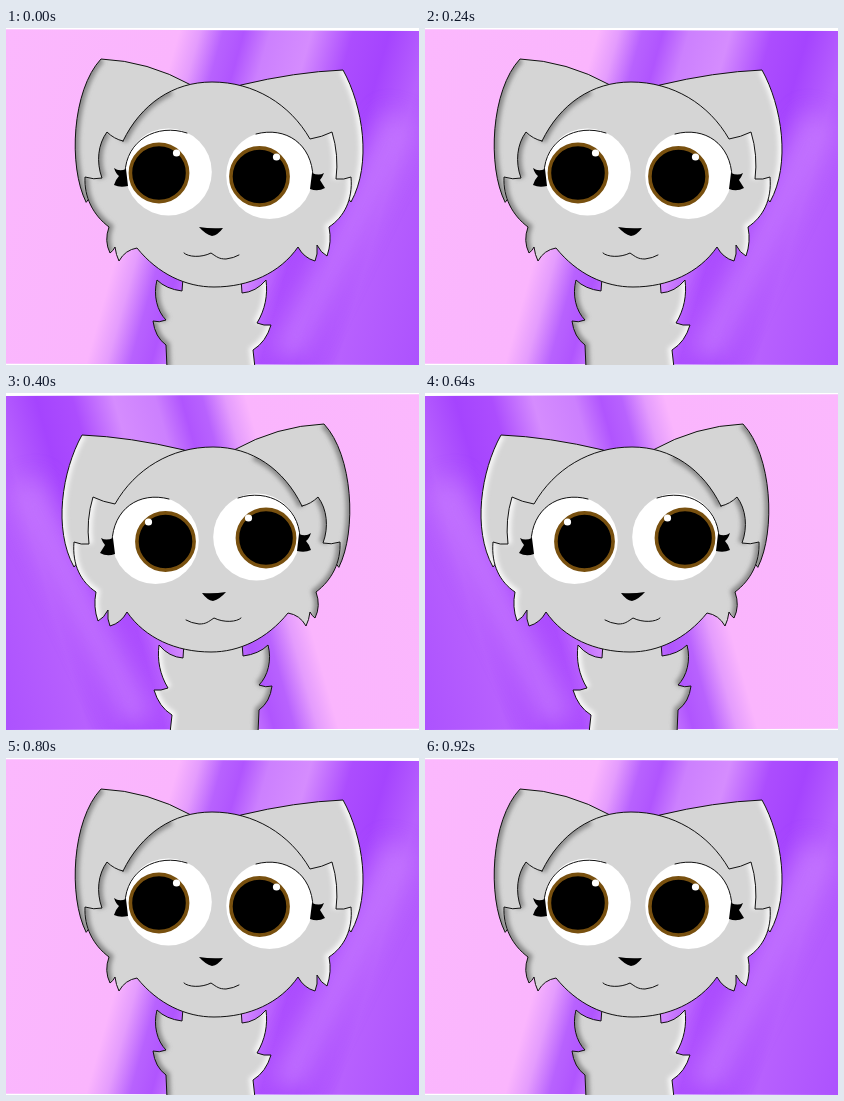
These frames come from a looping animation (413x337 px, 1000 ms). An HTML page:

```html
<!DOCTYPE html>
<html lang="en">
<head>
<meta charset="utf-8">
<title>Cat tilting its head</title>
<style>
html, body { margin: 0; width: 100%; height: 100%; overflow: hidden; background: #fff; }
svg { display: block; width: 100%; height: 100%; }
.line { fill: none; stroke: #111; stroke-width: 1; stroke-linejoin: round; stroke-linecap: round; }
.shade, .shine { fill: none; stroke-width: 8; filter: url(#soft); }
.shade { stroke: #8a8a8a; }
.shine { stroke: #f6f6f6; }
</style>
</head>
<body>
<svg viewBox="0 0 413 337">
  <defs>
    <linearGradient id="sky" gradientUnits="userSpaceOnUse" x1="0" y1="0" x2="482" y2="135">
      <stop offset="0" stop-color="#fbb8fd"/>
      <stop offset=".335" stop-color="#fab5fd"/>
      <stop offset=".375" stop-color="#e49cfd"/>
      <stop offset=".42" stop-color="#b862fe"/>
      <stop offset=".46" stop-color="#b055fe"/>
      <stop offset=".51" stop-color="#cc80fe"/>
      <stop offset=".59" stop-color="#d58cfe"/>
      <stop offset=".67" stop-color="#ac4dfe"/>
      <stop offset=".74" stop-color="#a544fe"/>
      <stop offset=".82" stop-color="#b760fe"/>
      <stop offset="1" stop-color="#ab50fe"/>
    </linearGradient>
    <filter id="soft" filterUnits="userSpaceOnUse" x="0" y="0" width="413" height="337">
      <feGaussianBlur stdDeviation="2.2"/>
    </filter>
    <filter id="glow" filterUnits="userSpaceOnUse" x="0" y="0" width="413" height="337">
      <feGaussianBlur stdDeviation="12"/>
    </filter>
    <clipPath id="backdrop"><path d="M0 1.3L413 3V337L0 335.7Z"/></clipPath>
  </defs>
  <g id="scene">
    <g clip-path="url(#backdrop)">
      <rect width="413" height="337" fill="url(#sky)"/>
      <path d="M395 90L280 330" stroke="#c87cfe" stroke-width="34" opacity=".75" filter="url(#glow)"/>
    </g>
    <g id="fur"></g>
    <g id="face"></g>
  </g>
</svg>
<script>
const LOOP = 1000;
const scene = document.getElementById('scene');

// Each part: closed outline, edges in shadow, edges in light.
const parts = [
  ['M177 250L176 263Q160 261 151 252C147 267 151 283 160 292Q153 295 147 293Q149 309 160 317L161 340H249L247 322Q260 314 265 297Q258 298 251 295C259 282 262 267 260 252Q250 264 236 265L235 250Z',
    'M151 252C147 267 151 283 160 292M147 293Q149 309 160 317L161 340',
    'M260 252C262 267 259 282 251 295M265 297Q260 314 247 322L249 340'],
  ['M80 174C62 138 66 62 95 31Q142 33 185 57L120 120Z',
    'M80 174C62 138 66 62 95 31', ''],
  ['M235 57Q289 44 337 42C357 78 366 136 345 174L300 120Z',
    '', 'M337 42C357 78 366 136 345 174'],
  ['M117 113C135 76 167 54 206 54C248 54 284 76 304 111Q316 109 326 104Q333 127 330 151Q338 152 345 149C347 172 338 189 323 199Q326 214 321 228Q315 225 311 217Q312 227 309 233Q298 230 292 219C274 245 243 259 208 259C180 259 152 246 131 220Q119 222 113 233Q110 227 109 219Q107 223 104 225Q98 213 103 199C87 187 78 169 79 149Q88 152 96 150C90 134 92 116 101 104Q108 111 117 113Z',
    'M101 104C92 116 90 134 96 150M79 149C78 169 87 187 103 199Q98 213 104 225M117 113C128 90 145 72 165 63',
    'M326 104Q333 127 330 151M345 149C347 172 338 189 323 199Q326 214 321 228']
];

document.getElementById('fur').innerHTML = parts.map(([outline, dark, light], i) => `
  <clipPath id="clip${i}"><path d="${outline}"/></clipPath>
  <path d="${outline}" fill="#d5d5d5"/>
  <g clip-path="url(#clip${i})">
    <path class="shade" d="${dark}"/>
    <path class="shine" d="${light}"/>
  </g>
  <path class="line" d="${outline}"/>`).join('');

const eye = (x, y, irisX, irisY, glintX, glintY) => `
  <ellipse cx="${x}" cy="${y}" rx="43.3" ry="43.5" fill="#fff"/>
  <circle cx="${irisX}" cy="${irisY}" r="28.6" fill="#000" stroke="#78500f" stroke-width="3.6"/>
  <circle cx="${glintX}" cy="${glintY}" r="3.6" fill="#fff"/>`;

document.getElementById('face').innerHTML =
  eye(162.5, 144, 153, 145, 170.5, 125) +
  eye(263.5, 147.5, 253.5, 148.5, 270.5, 129) + `
  <path class="line" d="M119 145C120 112 151 95 181 105M250 106C280 98 306 116 307 149"/>
  <path d="M120 141Q113 144 108 140Q110 146 113 148Q110 151 108 157Q114 160 122 158Z
           M306 145Q313 148 318 145Q316 150 314 152L319 160Q312 164 304 161Z"/>
  <path d="M193 199Q205 201 217 200Q212 207 206 208Q199 206 193 199Z"/>
  <path class="line" d="M178 225C182 229 195 230 205 225C211 229 213 231 220 231Q228 230 233 227"/>`;

function draw(now) {
  const time = now % LOOP;
  const mirrored = time >= 400 && time < 800;
  scene.setAttribute('transform', mirrored ? 'matrix(-1 0 0 1 413 0)' : '');
  requestAnimationFrame(draw);
}
draw(performance.now());
</script>
</body>
</html>
```
